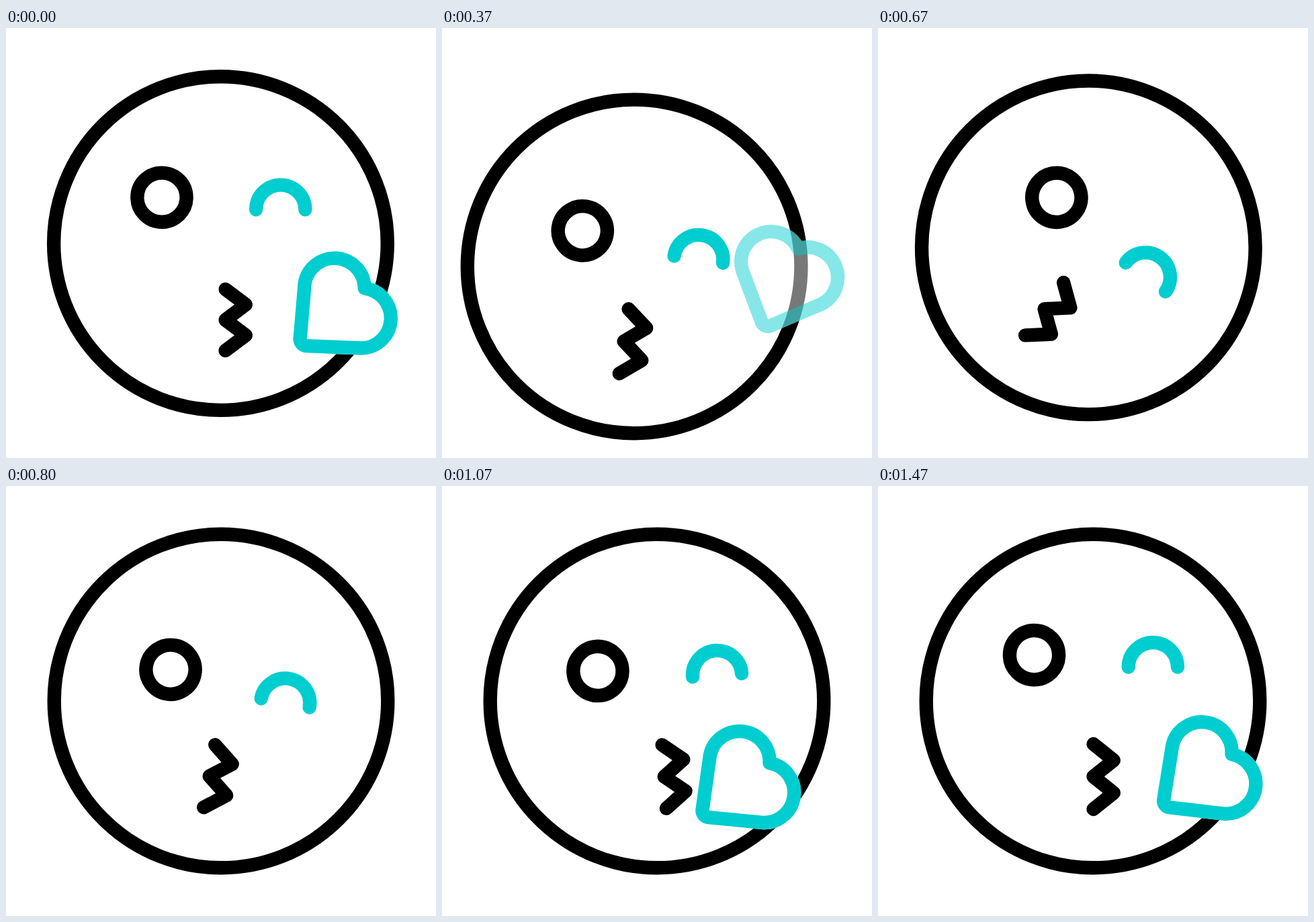
Write an HTML page that moves like this. It is 640 by 640 pixels and loops after 1.67 s.

```html
<!DOCTYPE html>
<html lang="en">
<head>
<meta charset="utf-8">
<title>Kiss</title>
<style>
  html, body { margin: 0; height: 100%; overflow: hidden; background: #fff; }
  svg { display: block; width: 100%; height: 100%; }
  path { vector-effect: non-scaling-stroke; }
</style>
</head>
<body>
<svg viewBox="0 0 640 640" fill="none" stroke="#000" stroke-width="20.4" stroke-linecap="round" stroke-linejoin="round">
  <defs>
    <clipPath id="beyondLips"><polygon id="clipShape"/></clipPath>
    <path id="heartShape" d="M0 -1.6A44.8 44.8 0 0 0 -64.1 60.6L-7.3 119.9A10.1 10.1 0 0 0 7.3 119.9L64.1 60.6A44.8 44.8 0 0 0 0 -1.6Z"/>
  </defs>
  <circle id="head" r="248.3"/>
  <g clip-path="url(#beyondLips)">
    <g id="heart">
      <use id="heartFill" href="#heartShape" fill="#fff" stroke="#fff"/>
      <use id="heartLine" href="#heartShape" stroke="#00cdcf"/>
    </g>
  </g>
  <g id="face">
    <g id="eyes">
      <circle cx="-87.5" cy="-68.4" r="36.6"/>
      <path stroke="#00cdcf" d="M52.7 -50.4a36.6 36.6 0 0 1 73.2 0"/>
    </g>
    <polyline id="mouth"/>
  </g>
</svg>
<script>
const LOOP = 1670, FRAME = 100 / 3, LAST = 44;
const CYCLE = 45.7; // the heart's flight continues across the loop seam
const $ = id => document.getElementById(id);
const set = (id, attrs) => {
  for (const name in attrs) $(id).setAttribute(name, attrs[name]);
};

// Goes smoothly from 0 to 1 between two frames.
function ease(f, start, end) {
  const p = Math.min(1, Math.max(0, (f - start) / (end - start)));
  return p * p * (3 - 2 * p);
}

function draw(f) {
  const go = (start, end) => ease(f, start, end);
  const shift = 34.8 * (go(-1, 12.3) - go(12.3, 23));
  const tilt = 36 * go(7, 20) - 51.2 * go(20, 28) + 27.2 * go(28, 37) - 12 * go(37, 44);
  const drop = go(4.2, 14.4) - go(27, 37);
  const kiss = go(-1, 2) - go(3, 10) + go(23, 28) - go(28, 33);

  const center = `translate(${320 - shift} ${320 + shift * 1.03})`;
  const pose = `${center} rotate(${tilt})`;
  set('head', { transform: center });
  set('face', { transform: pose });
  set('eyes', { transform: `translate(${5.3 * drop} ${36 * drop})` });

  const x = .5 + 25.5 * kiss, y = 112.5 + 5.5 * kiss, step = 24.25 - 5.6 * kiss;
  const zigzag = [-2, -1, 0, 1, 2].map(i => `${x + (i % 2 ? 30.3 : 0)},${y + i * step}`).join(' ');
  set('mouth', { points: zigzag });
  set('clipShape', {
    points: `${x},-900 ${zigzag} ${x},900 900,900 900,-900`,
    transform: pose
  });
  drawHeart(f < 20 ? f + CYCLE : f);
}

// Pops out of the lips, swings down, then floats up and fades.
function drawHeart(f) {
  const go = (start, end) => ease(f, start, end);
  const x = 385 + 120 * go(20, 36) + 40.5 * go(37, 51) - 30 * go(51, 62);
  const y = 394 + 46 * go(28, 37) - 111 * go(34.5, 58);
  const turn = 43 + 21 * go(28, 37) - 43 * go(36, 60);
  const opacity = go(24.7, 29) - go(51.5, 61.5);
  set('heart', { transform: `translate(${x} ${y}) rotate(${turn}) scale(${go(22, 31.8)})` });
  set('heartFill', { opacity });
  set('heartLine', { opacity });
}

// Thirty poses a second, then a rest on the last one.
function tick() {
  const time = performance.now() % LOOP;
  draw(Math.min(LAST, Math.floor((time + 3.4) / FRAME)));
  requestAnimationFrame(tick);
}
tick();
</script>
</body>
</html>
```
